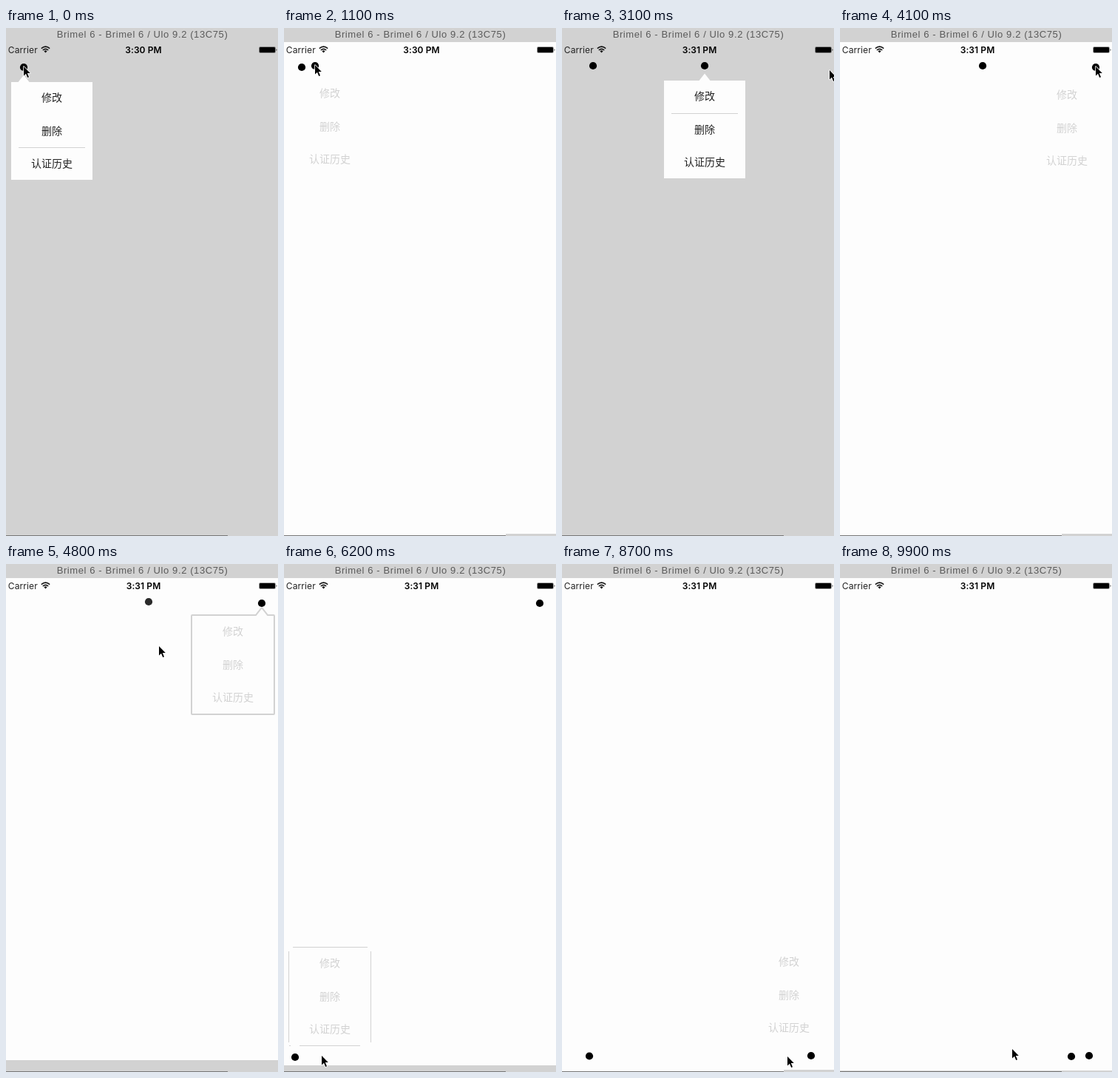
Write an HTML page that moves like this. It is 368 by 686 pixels and loops after 10000 ms.

```html
<!DOCTYPE html>
<html lang="zh">
<head>
<meta charset="utf-8">
<title>Popover menu</title>
<style>
  html, body { margin: 0; width: 100%; height: 100%; overflow: hidden; background: #fdfdfd; }
  svg { display: block; width: 368px; height: 686px; }
  text { text-anchor: middle; }
  .title { font: 300 13px "Liberation Sans", Arial, sans-serif; letter-spacing: .6px; fill: #5a5a5a; }
  .status { font: 12px Inter, sans-serif; letter-spacing: .1px; fill: #222; }
  .clock { font-weight: 600; fill: #000; }
  .item { font: 300 14px "Noto Sans CJK SC", "Noto Sans CJK", sans-serif; fill: #222; }
  .ghost .item { fill: #d2d2d2; font-weight: 500; }
  .faint .item { font-weight: 300; }
  #shape { fill: #fdfdfd; stroke: #d2d2d2; stroke-linejoin: round; paint-order: stroke; }
  #edge { fill: none; stroke: #d2d2d2; }
  #cursor { stroke: #fff; stroke-width: 1.6; stroke-linejoin: round; paint-order: stroke; }
</style>
</head>
<body>
<svg viewBox="0 0 368 686">
  <rect id="back" width="368" height="686"/>
  <rect width="368" height="19" fill="#d2d2d2"/>
  <rect id="strip" width="368" height="20" fill="#d2d2d2"/>
  <rect y="685" width="300" height="1" fill="#777"/>
  <text class="title" x="184.5" y="13">Brimel 6 - Brimel 6 / Ulo 9.2 (13C75)</text>
  <text class="status" x="22.8" y="33.7">Carrier</text>
  <g fill="none" stroke="#111" stroke-width="1.5">
    <path d="M47.8 27.6Q53.5 22.6 59.2 27.6M49.8 30Q53.5 26.7 57.2 30"/>
    <path d="M51.4 31.2Q53.5 29.4 55.6 31.2L53.5 33.5Z" fill="#111" stroke="none"/>
  </g>
  <text class="status clock" id="clock" x="186" y="33.7"></text>
  <rect x="342.5" y="25.5" width="22" height="8" rx="1.5" fill="none" stroke="#000" stroke-opacity=".35"/>
  <rect x="343" y="26" width="21" height="7" rx="1"/>
  <path d="M365.6 28Q367.4 29.5 365.6 31.2Z"/>
  <circle id="older" r="5.1"/>
  <circle id="newer" r="5.1"/>
  <g id="menu">
    <path id="shape"/>
    <path id="edge"/>
    <rect id="rule" x="10" width="90" height="1" fill="#d2d2d2"/>
    <text class="item" x="55" y="26">修改</text>
    <text class="item" x="55" y="71">删除</text>
    <text class="item" x="55" y="115">认证历史</text>
  </g>
  <path id="cursor" d="M1 2V14.5L4 11.7 6.2 17 8 16.2 5.8 11H9.8Z"/>
</svg>
<script>
const LOOP = 10000, STEP = 100, W = 110, H = 132;
const el = id => document.getElementById(id);
const set = (id, attrs) => {
  for (const k in attrs) el(id).setAttribute(k, attrs[k]);
};

// Each tap opens a menu; the pointer then drifts aside and dismisses it
const tap = (x, y, open, shut, ...aside) =>
  ({ x, y, open, shut, aside, low: y > 343, press: [x - 1, y - 3] });
const taps = [
  tap(24, 53, -500, 500, 60, 52),
  tap(42, 51, 1100, 1600, 105, 49),
  tap(193, 51, 2200, 3200, 361, 55),
  tap(346, 53, 4100, 4800, 206, 109),
  tap(15, 666, 5700, 6200, 50, 662),
  tap(37, 664.5, 6700, 7300, 63, 661),
  tap(337, 664, 7900, 8600, 304, 663),
  tap(313, 665, 9200, 9700, 232, 653)
];

function glide(a, b, t, t0, t1) {
  const k = Math.min(1, Math.max(0, (t - t0) / (t1 - t0)));
  const e = k * k * (3 - 2 * k);
  return a.map((v, i) => v + (b[i] - v) * e);
}

function cursorAt(m, next, t) {
  if (t <= m.shut + 100 || !next)
    return glide(m.press, m.aside, t, m.shut - 400, m.shut - 200);
  const arrive = Math.min(m.shut + 700, next.open - 100);
  return glide(m.aside, next.press, t, m.shut + 100, arrive);
}

function bubble(ax, low) {
  return low
    ? `M0 0H${W}V${H}H${ax + 7.5}L${ax} ${H + 10} ${ax - 7.5} ${H}H0Z`
    : `M0 0H${ax - 7.5}L${ax} -9.5 ${ax + 7.5} 0H${W}V${H}H0Z`;
}

// Outline with open corners and a gap at the arrow
function brokenEdge(ax, low) {
  const near = low ? H + .5 : -.5, far = H - near;
  const left = Math.min(9, ax - 8), right = Math.max(96, ax + 8);
  return `M-.5 5V${H - 4}M${W + .5} 5V${H - 4}M5 ${far}H106` +
    `M${left} ${near}H${ax - 6}M${ax + 6} ${near}H${right}`;
}

// Stage: -1 hidden, 0..2 fading outline, 3 settling, 4 open
function stageOf(m, t) {
  const away = (t - m.shut) / STEP, shown = (t - m.open) / STEP;
  if (away < 0) return Math.min(4, 2 + shown);
  const s = away + (m.low ? 1 : 0);
  return s < 3 ? s : -1;
}

function placeDot(id, m, fill) {
  set(id, { visibility: m ? "visible" : "hidden" });
  if (m) set(id, { cx: m.x, cy: m.y, fill });
}

function drawMenu(m, stage) {
  const ghost = stage < 3;
  const left = Math.max(7, Math.min(252, m.x - W / 2)), ax = m.x - left;
  const top = Math.round(m.low ? m.y - 20 - H : m.y + 20);
  const shift = [3, 4, 4, 2, 0][stage] * (m.low ? 1 : -1);
  set("menu", {
    class: ghost ? (stage === 2 ? "ghost faint" : "ghost") : "",
    transform: `translate(${left} ${top + shift})`
  });
  set("shape", { d: bubble(ax, m.low), "stroke-width": stage === 0 ? 4 : 0 });
  set("edge", { d: stage === 1 ? brokenEdge(ax, m.low) : "" });
  set("rule", { y: m.y < 52 ? 44 : 88, opacity: ghost ? 0 : 1 });
}

function draw(t) {
  const n = taps.filter(m => m.open <= t).length;
  const m = taps[n - 1], stage = stageOf(m, t);
  const tall = [16, 9, 3][stage] || 2;

  set("back", { fill: stage > 2 ? "#d2d2d2" : "#fdfdfd" });
  set("strip", { y: 686 - tall, x: stage === 2 ? 300 : 0 });
  el("clock").textContent = t < 2200 ? "3:30 PM" : "3:31 PM";
  placeDot("older", taps[n - 2], stage === 0 ? "#2a2a2a" : "#000");
  placeDot("newer", m, "#000");
  set("menu", { visibility: stage < 0 ? "hidden" : "visible" });
  if (stage >= 0) drawMenu(m, stage);
  set("cursor", { transform: `translate(${cursorAt(m, taps[n], t)})` });
}

const start = performance.now();
function tick(now) {
  const t = Math.max(0, now - start) % LOOP;
  draw(Math.floor(t / STEP) * STEP);
  requestAnimationFrame(tick);
}
draw(0);
requestAnimationFrame(tick);
</script>
</body>
</html>
```
